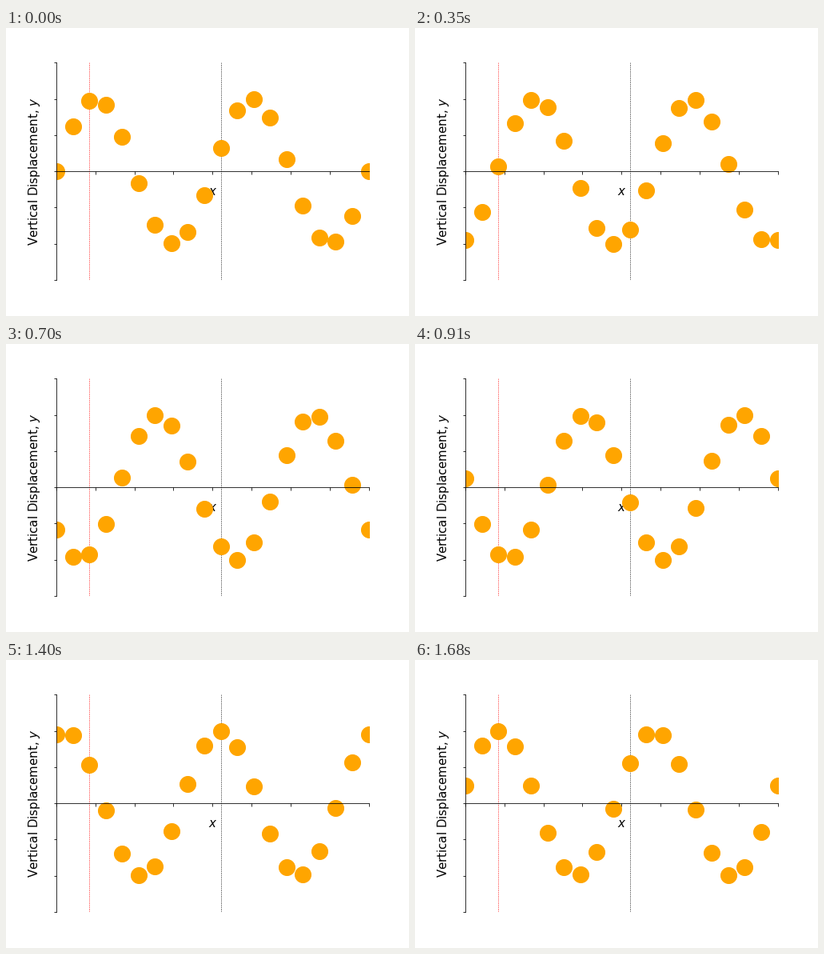
A matplotlib script for the animation above (1750 ms loop, 504 by 360 pixels).

```python
import numpy as np
import matplotlib.pyplot as plt
from matplotlib.animation import FuncAnimation

FRAMES = 25
INTERVAL = 70
POINTS = 20
LABEL = dict(fontsize=15, labelpad=11)

plt.rcParams["font.family"] = "DejaVu Sans"

fig, ax = plt.subplots(figsize=(7, 5), dpi=72)
fig.subplots_adjust(left=0.125, right=0.9, bottom=0.125, top=0.88)

ax.set_xlim(0, 4)
ax.set_ylim(-1.5, 1.5)
ax.set_xticks(np.arange(0, 4.1, 0.5))
ax.set_yticks(np.arange(-1.5, 1.6, 0.5))
ax.set_xticklabels([])
ax.set_yticklabels([])
ax.spines[["top", "right"]].set_visible(False)
ax.spines["bottom"].set_position("zero")
ax.set_xlabel("$x$", **LABEL)
ax.set_ylabel("Vertical Displacement, $y$", **LABEL)

# Two wavelengths span the axis
x = np.linspace(0, 4, POINTS)
for index, color in ((2, "red"), (10, "black")):
    ax.axvline(x[index], color=color, linestyle="--", linewidth=0.5)
dots, = ax.plot(x, np.sin(np.pi * x), "o", color="orange", markersize=20)


def update(frame):
    phase = 2 * np.pi * frame / FRAMES
    dots.set_ydata(np.sin(np.pi * x - phase))
    return dots,


anim = FuncAnimation(fig, update, frames=FRAMES, interval=INTERVAL,
                     repeat=True, repeat_delay=0)
plt.show()
```
